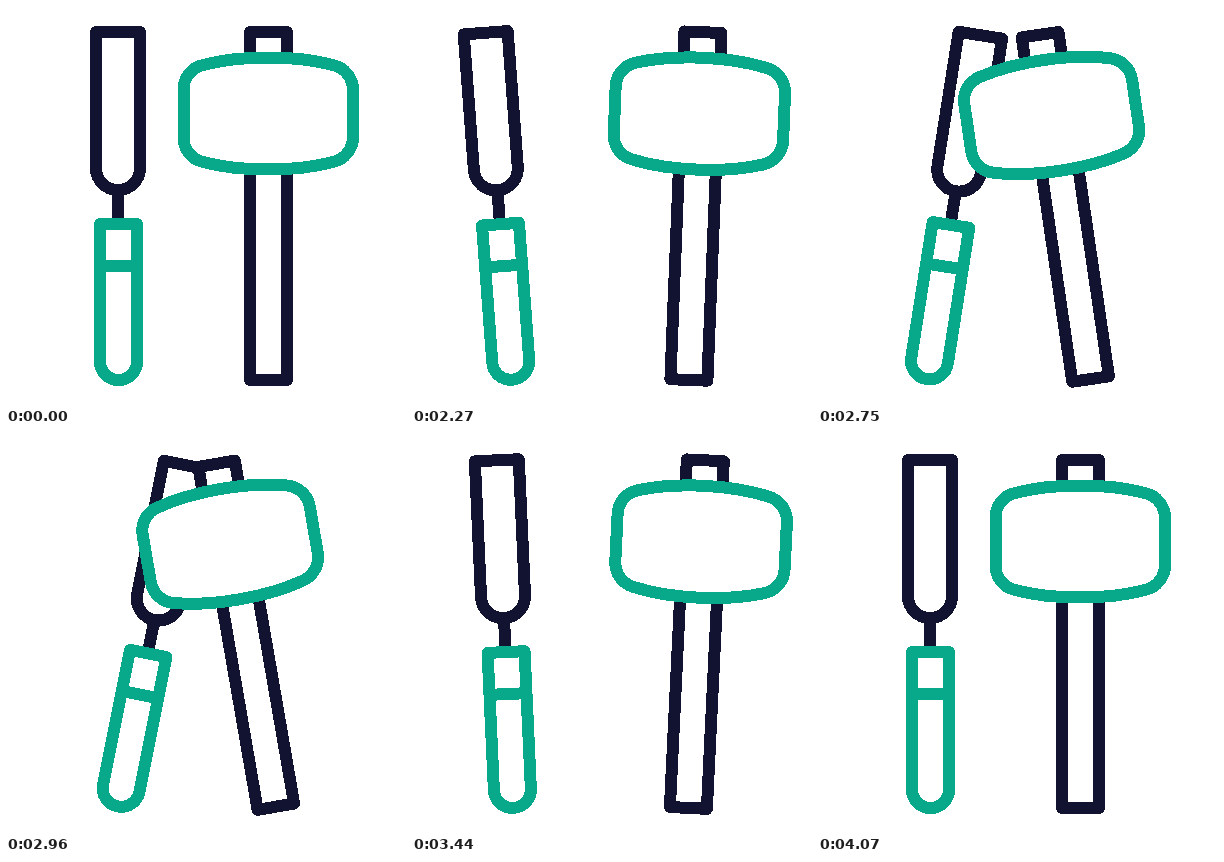
These frames come from a looping animation (400x400 px, 4.1 s). An HTML page:

```html
<!DOCTYPE html>
<html>
<head>
<meta charset="utf-8">
<style>
  html, body { margin: 0; width: 100%; height: 100%; overflow: hidden; background: #fff; }
  svg { display: block; width: 100%; height: 100%; shape-rendering: crispEdges; }
  path { fill: #fff; stroke-width: 12; stroke-linejoin: round; }
  .dark { stroke: #121331; }
  .green { stroke: #08a88a; }
</style>
</head>
<body>
<svg viewBox="0 0 400 400">
  <g id="chisel">
    <path class="dark" d="M112 184V218"/>
    <path class="dark" d="M90 26H134V162A22 22 0 0 1 90 162Z"/>
    <path class="green" d="M94 218H131V355.500A18.500 18.500 0 0 1 94 355.500ZM94 260H131"/>
  </g>
  <g id="mallet">
    <path class="dark" d="M244 26H281V374H244Z"/>
    <path class="green" d="M177.500 84V131C177.500 143 185 153 197 156C216 161 238 163.500 262 163.500S308 161 327 156C339 153 347 143 347 131V84C347 72 339 62 327 59C308 54 286 51.500 262 51.500S216 54 197 59C185 62 177.500 72 177.500 84Z"/>
  </g>
</svg>
<script>
const LOOP = 4100;
const PIVOT_Y = 290;
// Swing turning points: out, in, out, in, rest
const times = [2000, 2500, 2855, 3350, 3690, 4070];
const tools = [
  { id: 'chisel', x: 112, shift: [0, -33.1, 20.3, -19.3, 4.4, 0], tilt: [0, -7.6, 13.3, -3.4, 1, 0] },
  { id: 'mallet', x: 262, shift: [0, 31.6, -10.9, 22.8, -4.4, 0], tilt: [0, 4.1, -11.6, 3.6, -1, 0] }
];

function track(values, t) {
  const i = times.findIndex(end => t < end);
  if (i < 1) return 0;
  const u = (t - times[i - 1]) / (times[i] - times[i - 1]);
  return values[i - 1] + (values[i] - values[i - 1]) * u * u * (3 - 2 * u);
}

const start = performance.now();

function draw() {
  const t = (performance.now() - start) % LOOP;
  for (const { id, x, shift, tilt } of tools) {
    document.getElementById(id).setAttribute('transform',
      `translate(${track(shift, t)} 0) rotate(${track(tilt, t)} ${x} ${PIVOT_Y})`);
  }
  requestAnimationFrame(draw);
}
draw();
</script>
</body>
</html>
```
